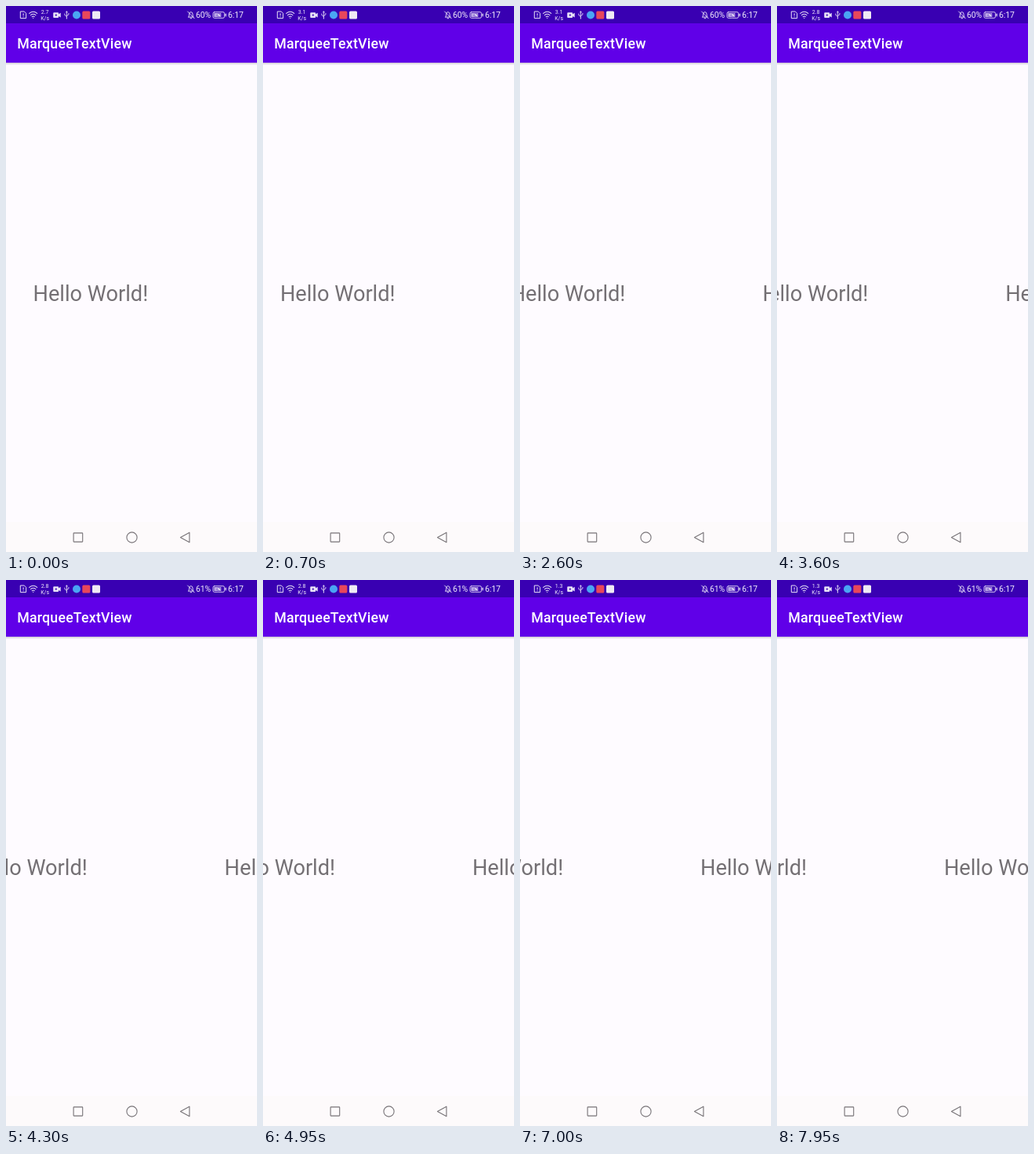
An HTML page that plays this animation: 320 by 694 pixels, repeating every 8000 ms.

```html
<!DOCTYPE html>
<html lang="en">
<head>
<meta charset="utf-8">
<title>MarqueeTextView</title>
<style>
  html, body { margin: 0; width: 100%; height: 100%; overflow: hidden; background: #fefbff; }
  svg { display: block; width: 100%; height: 100%; }
  text { font-family: Roboto, sans-serif; }
</style>
</head>
<body>
<svg viewBox="0 0 320 694">
  <defs>
    <linearGradient id="shade" x2="0" y2="1">
      <stop offset="0" stop-color="#c9c2d0"/>
      <stop offset="1" stop-color="#fefbff"/>
    </linearGradient>
  </defs>
  <rect width="320" height="694" fill="#fefbff"/>
  <rect y="656" width="320" height="38" fill="#fdfafb"/>
  <rect y="72" width="320" height="3" fill="url(#shade)"/>
  <rect y="22" width="320" height="50" fill="#6000e8"/>
  <rect width="320" height="22" fill="#3900b2"/>
  <text x="14.2" y="54" font-size="17.78" font-weight="500" letter-spacing=".2" fill="#fff">MarqueeTextView</text>

  <g id="marquee" font-size="27.2" fill="#747074">
    <text x="34.5" y="375.3">Hello World!</text>
    <text x="356" y="375.3">Hello World!</text>
  </g>

  <g fill="none" stroke="#e6e0f6" stroke-linecap="round" stroke-linejoin="round">
    <!-- SIM -->
    <path d="M18.7 7h4.6l2.3 2.3v6.3h-6.9z"/>
    <path d="M22.1 9.7v2.2M22.1 13.7v.1"/>
    <!-- Wi-Fi -->
    <path d="M29.7 9.4q5-4.4 10 0M31.5 11.6q3.2-2.7 6.4 0M33.2 13.6q1.5-1.1 3 0M34.7 15.3v.1" stroke-width="1.1"/>
    <!-- USB -->
    <path d="M77.4 7v9M74.9 10v1.6l2.5 1.8M79.9 9.4v1.5l-2.5 1.6M76.5 8l.9-1.2.9 1.2M77.4 15.6v.2" stroke-width=".9"/>
    <!-- Muted bell -->
    <path d="M232.7 14.1h6.3q-.9-.9-.9-3.4 0-2.8-2.3-3.1-2.3.3-2.3 3.1 0 2.5-.8 3.4M235 15.7h1.6M231.6 7l8.6 8.8" stroke-width=".95"/>
    <!-- Battery -->
    <rect x="264" y="7.7" width="14.4" height="7.6" rx="1.6" stroke-width=".9"/>
    <path d="M280.1 10.2v2.6" stroke-width="1.3"/>
  </g>
  <g fill="#e6e0f6">
    <path d="M61.2 8.2h4.9q1 0 1 1v1.1l2.6-1.6v5.8l-2.6-1.6v1.1q0 1-1 1h-4.9q-1 0-1-1v-4.8q0-1 1-1z"/>
    <rect x="265.3" y="9" width="9" height="5" rx=".6" opacity=".75"/>
    <path d="M272.4 8.2l-4 4h2.7l-.7 3 4.2-4.3h-2.8z" fill="#fff" stroke="#3900b2" stroke-width=".5"/>
  </g>
  <circle cx="63.8" cy="11.6" r="1.1" fill="#3900b2"/>
  <circle cx="90" cy="11.5" r="5" fill="#4aa5f3"/>
  <rect x="97.3" y="6.5" width="10" height="10" rx="1.5" fill="#e8475b"/>
  <rect x="110" y="6.5" width="10" height="10" rx="1.5" fill="#efeaf4"/>

  <g fill="#f0ecfa">
    <g font-size="7" text-anchor="middle">
      <text id="speed" x="49.6" y="10.4"></text>
      <text x="49.6" y="18.2">K/s</text>
    </g>
    <text id="charge" x="241.9" y="15.2" font-size="10.4"></text>
    <text x="282.9" y="15.2" font-size="10.4">6:17</text>
  </g>

  <g fill="none" stroke="#777377" stroke-width="1.1">
    <rect x="86.1" y="669.9" width="11.6" height="11.2" rx=".5"/>
    <circle cx="160.5" cy="675.5" r="6.6"/>
    <path d="M222.4 675.5l11.5-6.3v12.6z" stroke-linejoin="round"/>
  </g>
</svg>
<script>
const LOOP = 8000, STEP = 50, SPEED = 18;
const speeds = [[0, '2.7'], [300, '3.1'], [3300, '2.8'], [6300, '1.3']];
const charges = [[0, '60%'], [4250, '61%']];

const el = id => document.getElementById(id);
const marquee = el('marquee'), speed = el('speed'), charge = el('charge');
const valueAt = (list, t) => list.filter(([from]) => from <= t).pop()[1];

function draw(t) {
  marquee.setAttribute('transform', `translate(${-SPEED * t / 1000} 0)`);
  speed.textContent = valueAt(speeds, t);
  charge.textContent = valueAt(charges, t);
}

const start = performance.now();
function tick() {
  const t = (performance.now() - start) % LOOP;
  draw(Math.floor(t / STEP) * STEP);
  requestAnimationFrame(tick);
}
tick();
</script>
</body>
</html>
```
